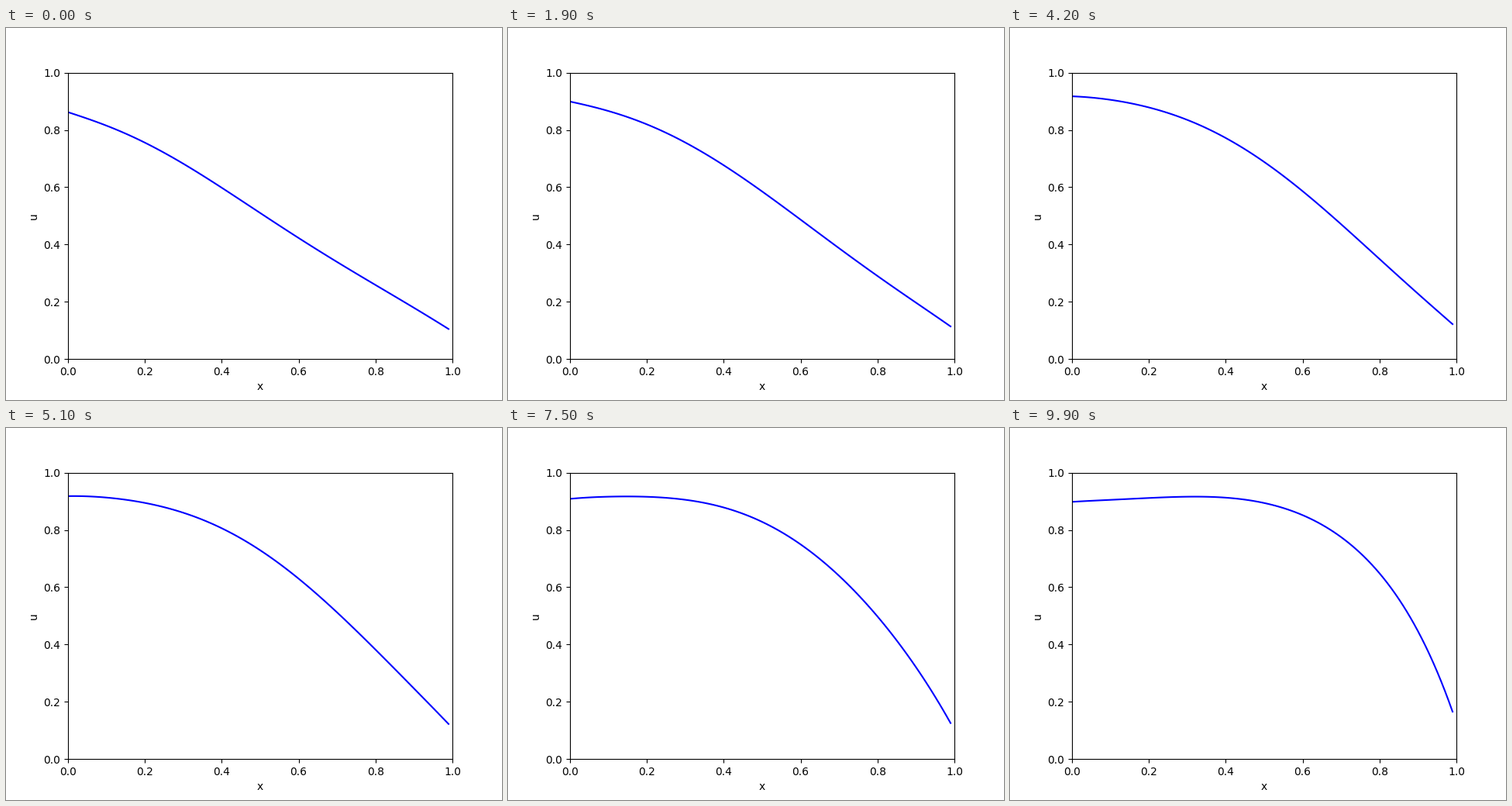
Recreate the animation shown at these times as a matplotlib script. Size 640 by 480 pixels, loop 10000 ms.

```python
import numpy as np
import matplotlib.pyplot as plt
from matplotlib.animation import FuncAnimation

FRAMES = 100
INTERVAL = 100

# Key points of the wave: where, when, and the height u there.
KEY_X = [0, .1, .3, .5, .7, .9, .99]
KEY_T = [0, 1.9, 5.1, 8.5, 9.9]
KEY_U = np.array([
    [.862, .815, .682, .510, .339, .179, .105],
    [.899, .866, .756, .585, .387, .197, .114],
    [.918, .913, .860, .729, .512, .2465, .1225],
    [.903, .912, .914, .861, .697, .366, .1345],
    [.898, .905, .916, .894, .775, .4465, .1655],
])


def lagrange(nodes, p):
    """Weights of the polynomial through the nodes, evaluated at p."""
    return np.array([
        np.prod([(p - b) / (a - b) for b in nodes if b != a], axis=0)
        for a in nodes
    ])


x = np.arange(100) / 100
x_weights = lagrange(KEY_X, x)


def profile(t):
    return lagrange(KEY_T, t) @ KEY_U @ x_weights


fig, ax = plt.subplots(figsize=(6.4, 4.8), dpi=100)
ax.set(xlim=(0, 1), ylim=(0, 1), xlabel="x", ylabel="u")
line, = ax.plot(x, profile(0), color="blue", lw=1.5)


def update(i):
    line.set_ydata(profile(i * INTERVAL / 1000))
    return line,


anim = FuncAnimation(fig, update, frames=FRAMES, interval=INTERVAL, repeat=True)
plt.show()
```
